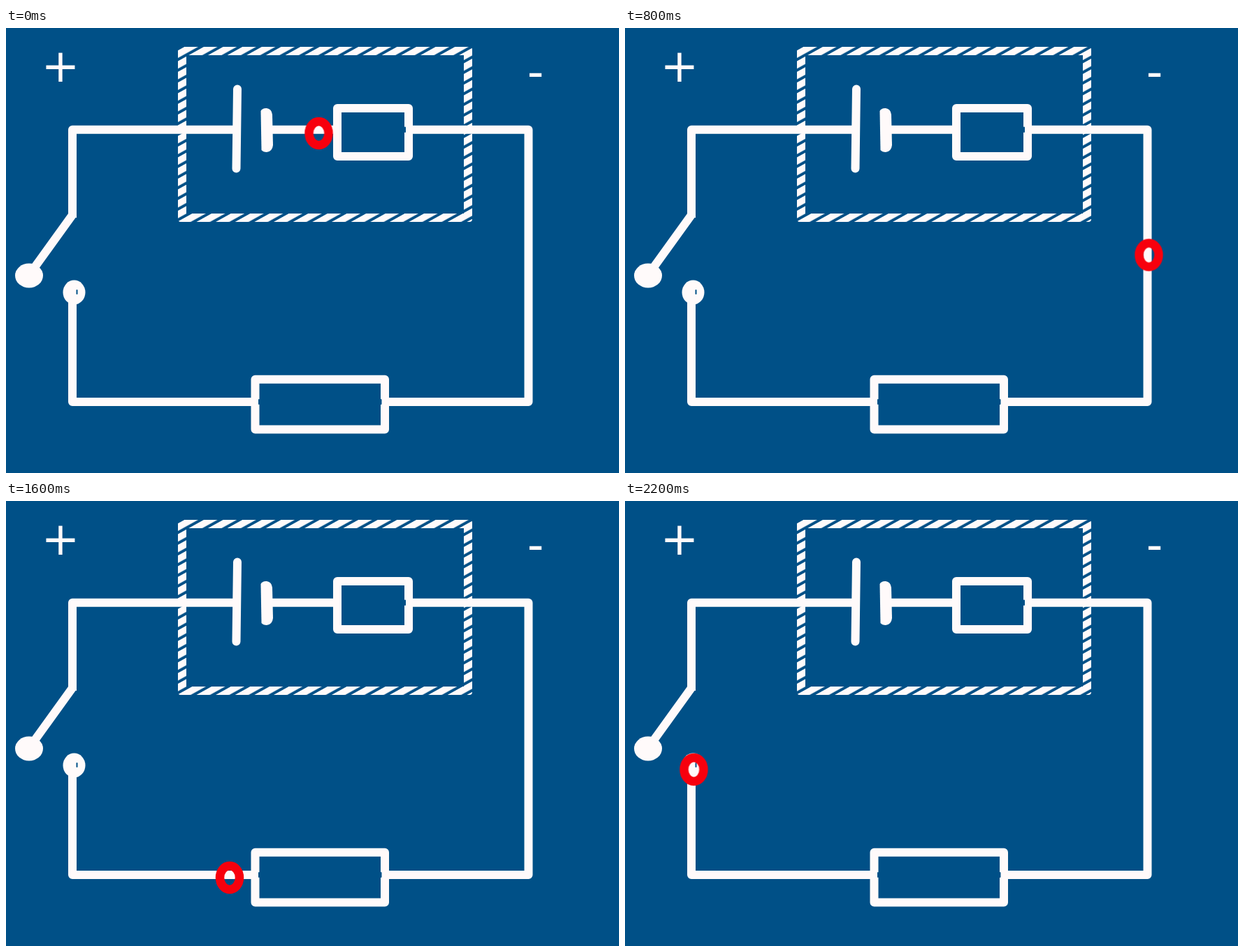
Recreate the animation shown at these times as an HTML page. Size 877 by 638 pixels, loop 2.4 s.

```html
<!DOCTYPE html>
<html lang="en">
<head>
<meta charset="utf-8">
<title>Electric circuit</title>
<style>
  html, body { margin: 0; width: 100%; height: 100%; overflow: hidden; background: #005087; }
  svg { display: block; width: 877px; height: 638px; }
  text { font: 65.5px "DejaVu Sans", sans-serif; fill: #fffafa; }
  .wire { fill: none; stroke: #fffafa; stroke-width: 12; stroke-linejoin: round; }
  .fill { fill: #fffafa; }
  .nick { fill: none; stroke: #005087; stroke-width: 2; stroke-linecap: round; }
  .charge {
    fill: none; stroke: #f7000d; stroke-width: 12.5;
    animation: flow 2400ms infinite;
  }
  /* One position per 100 ms; the charge skips across both resistors. */
  @keyframes flow {
    0%       { transform: translate(447.5px, 151px); animation-timing-function: steps(1); }
    4.1666%  { transform: translate(604px, 150px);   animation-timing-function: steps(2); }
    12.4999% { transform: translate(689.5px, 149px); animation-timing-function: steps(1); }
    16.6666% { transform: translate(733px, 149px);   animation-timing-function: steps(1); }
    20.8333% { transform: translate(749.5px, 175px); animation-timing-function: steps(1); }
    24.9999% { transform: translate(749.5px, 219px); animation-timing-function: steps(5); }
    45.8333% { transform: translate(749.5px, 485px); animation-timing-function: steps(1); }
    49.9999% { transform: translate(727px, 533px);   animation-timing-function: steps(3); }
    62.4999% { transform: translate(567px, 538.5px); animation-timing-function: steps(1); }
    66.6666% { transform: translate(320px, 540px);   animation-timing-function: steps(2); }
    74.9999% { transform: translate(172px, 538px);   animation-timing-function: steps(1); }
    79.1666% { transform: translate(114.5px, 538px); animation-timing-function: steps(1); }
    83.3333% { transform: translate(94.5px, 500px);  animation-timing-function: steps(2); }
    91.6666%, 100% { transform: translate(98.5px, 385px); animation-timing-function: steps(1); }
  }
</style>
</head>
<body>
<svg viewBox="0 0 877 638">
  <defs>
    <pattern id="hatch" width="40" height="13.4" patternUnits="userSpaceOnUse" patternTransform="rotate(-29)">
      <rect width="40" height="9.4" fill="#fffafa"/>
    </pattern>
  </defs>

  <text x="50.5" y="77">+</text>
  <text x="745.8" y="84.8">-</text>

  <!-- battery casing -->
  <path fill="url(#hatch)" fill-rule="evenodd"
    d="M250 27H663Q667 27 667 31V274Q667 278 663 278H250Q246 278 246 274V31Q246 27 250 27ZM258 39V266H655V39Z"/>

  <!-- wires -->
  <g class="wire">
    <path d="M330 145.800H95V272"/>
    <path d="M376 145.800H476"/>
    <path d="M575 145.800H747.500V536H541"/>
    <path d="M358 536H95V385"/>
    <path d="M95 268L36 350"/>
  </g>

  <!-- cell plates -->
  <path class="wire" stroke-linecap="round" d="M331 87.500L329.500 201.500"/>
  <path class="fill" d="M364.500 119Q367 114.500 373 115Q380 116 381 124L382 168Q381 177 373 178Q368 178 365.500 175Z"/>

  <!-- resistors -->
  <rect class="wire" x="474" y="115" width="102" height="69"/>
  <rect class="wire" x="356.500" y="503.700" width="185.500" height="71.800"/>
  <path class="nick" d="M571 142.500V149M362 533V539M536.500 533V539"/>

  <!-- switch contacts -->
  <ellipse class="fill" cx="33" cy="355" rx="20" ry="17.500"/>
  <ellipse class="fill" cx="97.500" cy="379" rx="16" ry="17.500"/>
  <path class="nick" stroke-width="1.500" d="M101.500 376V381"/>

  <ellipse class="charge" rx="14" ry="17"/>
</svg>
</body>
</html>
```
